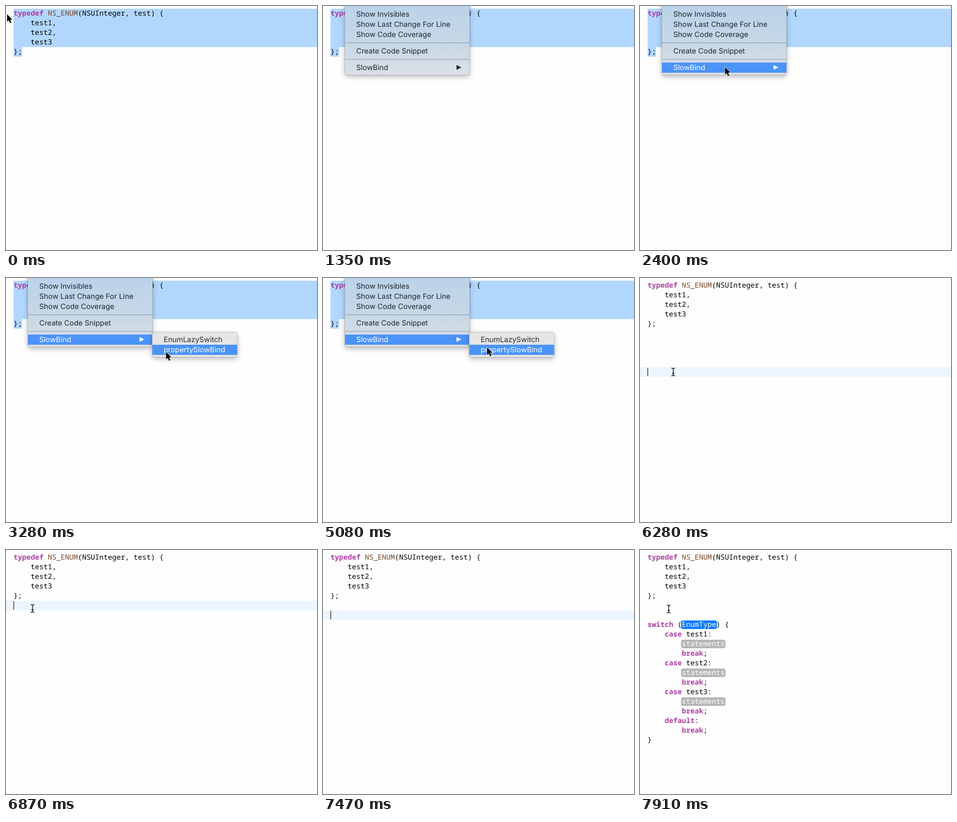
An HTML page for the animation above (8 s loop, 580 px wide and 457 px high).

```html
<!DOCTYPE html>
<html lang="en">
<head>
<meta charset="utf-8">
<title>Enum switch menu</title>
<style>
  html, body { margin: 0; width: 100%; height: 100%; overflow: hidden; background: #fefefe; }
  svg { display: block; width: 580px; height: 457px; }
  text { white-space: pre; text-rendering: geometricPrecision; }
  .code { font: 13.333px "Noto Sans Mono", "DejaVu Sans Mono", monospace; }
  .keyword { font-weight: 700; fill: #ad3da4; }
  .macro { fill: #78492a; }
  .token { fill: #fff; }
  .item text { font: 13.6px Inter, "Liberation Sans", sans-serif; fill: #1d2730; }
  .item path { fill: #1d2730; }
  .item rect { fill: #4a93f8; visibility: hidden; }
  .item.on rect { visibility: visible; }
  .item.on text, .item.on path { fill: #fff; }
  #submenu .item:not(.on) text { fill: #2b2b2b; }
  .panel { stroke: #000; stroke-opacity: .16; filter: drop-shadow(0 3px 5px rgba(0, 0, 0, .27)); }
</style>
</head>
<body>
<svg viewBox="0 0 580 457">
  <defs>
    <linearGradient id="glass" gradientUnits="userSpaceOnUse" x1="0" y1="0" x2="0" y2="129">
      <stop offset="0" stop-color="#bad3ea"/>
      <stop offset=".5" stop-color="#c6d7e6"/>
      <stop offset="1" stop-color="#dce0e5"/>
    </linearGradient>
  </defs>

  <path id="selection" fill="#b2d7ff" d="M14 5H580V77H30V95H14Z"/>
  <g id="line">
    <rect width="580" height="18" fill="#ecf5ff"/>
    <rect x="14" y="1" width="1" height="16"/>
  </g>
  <g id="declaration"></g>
  <g id="switchBlock"></g>

  <g id="menus">
    <g id="menu">
      <rect class="panel" x="40.5" y="-20" width="233" height="149.5" rx="5" fill="url(#glass)"/>
      <path d="M41 69H273M41 100H273" stroke="#5f7080" stroke-opacity=".3" stroke-width="2"/>
    </g>
    <g id="submenu">
      <rect class="panel" x="272.5" y="101.5" width="159" height="47" rx="5" fill="#e5e5e5"/>
    </g>
  </g>

  <path id="arrow" stroke="#fff" stroke-width="1.2" paint-order="stroke"
        d="M0 0V14L3.2 11.2L5.6 16.5L8 15.5L5.7 10.3H10Z"/>
  <path id="beam" fill="none" stroke="#111" stroke-width="1.3"
        d="M-3.5-7.3Q-.4-7.3 0-5Q.4-7.3 3.5-7.3M-3.5 7.3Q-.4 7.3 0 5Q.4 7.3 3.5 7.3M0-5V5M-2 2.5H2"/>
</svg>

<script>
const $ = id => document.getElementById(id);
const ROW = 18, COLUMN = 8, LEFT = 14, TOP = 5, LOOP = 8000;
const rowTop = row => TOP + row * ROW;

function add(parent, markup) {
  parent.insertAdjacentHTML("beforeend", markup);
  return parent.lastElementChild;
}

// Placeholders are written as <name>; the first one is the active field.
function addCode(parent, firstRow, source) {
  source.split("\n").forEach((line, i) => {
    const y = rowTop(firstRow + i);
    const field = line.match(/<(\w+)>/);
    if (field) {
      const x = LEFT + field.index * COLUMN - 1.5;
      const color = field[1] === "EnumType" ? "#0a7bff" : "#b6b6b6";
      add(parent, `<rect x="${x}" y="${y + 1}" width="${field[1].length * COLUMN + 3}"
        height="16" rx="4" fill="${color}"/>`);
    }
    const spans = line
      .replace(/<(\w+)>/, '<tspan class="token">$1</tspan>')
      .replace(/\b(typedef|switch|case|break|default)\b/g, '<tspan class="keyword">$1</tspan>')
      .replace("NS_ENUM", '<tspan class="macro">NS_ENUM</tspan>');
    add(parent, `<text class="code" x="${LEFT}" y="${y + 13}">${spans}</text>`);
  });
}

function addItem(parent, x, width, y, label, hasArrow) {
  const arrow = hasArrow ? `<path d="M249 ${y - 4.5}L258 ${y}L249 ${y + 4.5}Z"/>` : "";
  return add(parent, `<g class="item"><rect x="${x}" y="${y - 9}" width="${width}" height="19"/>
    <text x="${x + 21}" y="${y + 5}">${label}</text>${arrow}</g>`);
}

addCode($("declaration"), 0,
  "typedef NS_ENUM(NSUInteger, test) {\n    test1,\n    test2,\n    test3\n};");

const cases = [1, 2, 3].map(n =>
  `    case test${n}:\n        <statements>\n        break;`).join("\n");
addCode($("switchBlock"), 7,
  `switch (<EnumType>) {\n${cases}\n    default:\n        break;\n}`);

const mainItem = (y, label, hasArrow) => addItem($("menu"), 41, 232, y, label, hasArrow);
const subItem = (y, label) => addItem($("submenu"), 273, 158, y, label);
mainItem(15, "Show Invisibles");
mainItem(34, "Show Last Change For Line");
mainItem(53, "Show Code Coverage");
const items = {
  create: mainItem(84, "Create Code Snippet"),
  plugin: mainItem(115, "SlowBind", true),
  enumSwitch: subItem(115, "EnumLazySwitch"),
  property: subItem(134, "propertySlowBind")
};

// Each step changes only the listed parts of the state.
const steps = [
  [0, { arrow: [2, 15.5], beam: null, selected: true, line: null, menu: 0, sub: false, on: [], pasted: false }],
  [600, { arrow: null }],
  [1350, { menu: 1 }],
  [1950, { arrow: [118, 82], on: ["create"] }],
  [2100, { arrow: [134, 93] }],
  [2250, { arrow: [149, 108], on: ["plugin"] }],
  [2400, { arrow: [158.5, 114.5] }],
  [2550, { arrow: [195, 115] }],
  [2700, { arrow: [243, 116], sub: true }],
  [2850, { arrow: [278, 121], on: ["plugin", "enumSwitch"] }],
  [2990, { arrow: [290, 132], on: ["plugin", "property"] }],
  [3140, { arrow: [295, 145], on: ["plugin"] }],
  [3280, { arrow: [298.5, 138.5], on: ["plugin", "property"] }],
  [5080, { arrow: [306, 130] }],
  [5230, { arrow: [315.5, 118.5], on: ["plugin", "enumSwitch"] }],
  [5530, { on: ["plugin"] }],
  [5680, { on: ["plugin", "enumSwitch"], menu: .2 }],
  [5830, { arrow: null, beam: [300, 127], menu: 0 }],
  [5980, { beam: [215, 150] }],
  [6130, { beam: [110, 170] }],
  [6280, { beam: [62, 176], selected: false, line: 9 }],
  [6580, { beam: [57, 152] }],
  [6720, { beam: [50, 115] }],
  [6870, { beam: [49.5, 109.5], line: 5 }],
  [7470, { beam: null, line: 6 }],
  [7760, { line: null, pasted: true }],
  [7910, { beam: [53.5, 110.5] }]
];

const show = (id, visible) => $(id).style.display = visible ? "" : "none";

function place(id, point) {
  show(id, point);
  if (point) $(id).setAttribute("transform", `translate(${point})`);
}

function render(time) {
  const state = Object.assign({}, ...steps.filter(([at]) => at <= time).map(([, change]) => change));
  place("arrow", state.arrow);
  place("beam", state.beam);
  place("line", state.line === null ? null : [0, rowTop(state.line)]);
  show("selection", state.selected);
  show("switchBlock", state.pasted);
  show("menus", state.menu);
  show("submenu", state.sub);
  $("menus").style.opacity = state.menu;
  // An opaque menu blurs the code behind it away.
  for (const name in items) items[name].classList.toggle("on", state.on.includes(name));
}

const start = performance.now();
function tick() {
  render((performance.now() - start) % LOOP);
  requestAnimationFrame(tick);
}
tick();
</script>
</body>
</html>
```
